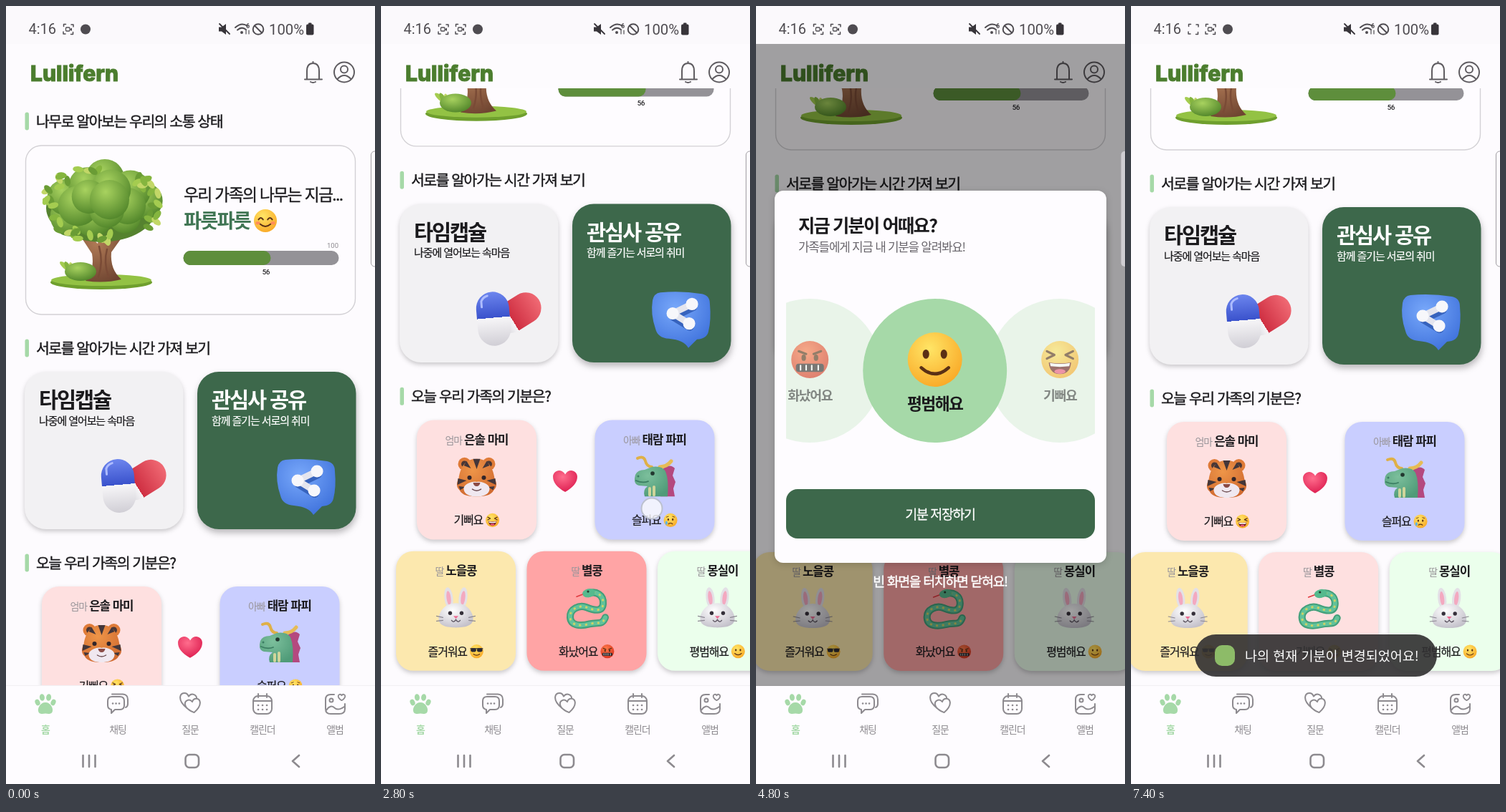
An HTML page for the animation above (7.5 s loop, 515 px wide and 1087 px high).

```html
<!DOCTYPE html>
<html lang="ko">
<head>
<meta charset="utf-8">
<style>
html,body{margin:0;width:100%;height:100%;overflow:hidden;background:#fdfbfe}
svg{display:block;width:100vw;height:100vh}
text{font-family:"Noto Sans CJK KR","Noto Sans KR",sans-serif;letter-spacing:-.073em;white-space:pre}
.lat{font-family:Roboto,sans-serif;letter-spacing:0}
.logo{font-family:Inter,sans-serif;letter-spacing:0}
.wide{letter-spacing:0}
.sh{filter:drop-shadow(0 3px 3px rgba(0,0,0,.2))}
.deep{filter:drop-shadow(1px 5px 5px rgba(0,0,0,.27))}
.pop{filter:drop-shadow(0 2px 5px rgba(0,0,0,.16))}
.line{fill:none;stroke:#8d8a8f;stroke-width:2;stroke-linecap:round;stroke-linejoin:round}
.dots{stroke-width:2.6}
</style>
</head>
<body>
<svg id="stage" viewBox="0 0 515 1087"></svg>
<script>
const GREEN = '#3d684b', MINT = '#a6d9a8', INK = '#1b1a1d', GRAY = '#8d8a8f', DARK = '#4f4c51', PAPER = '#fefcff';
const PINK = '#fee0e0', BLUE = '#c9ceff', SAND = '#fce8ae', RED = '#ffa4a5', LIME = '#ebffec';

let seed = 7;
const rnd = () => (seed = (seed * 16807) % 2147483647) / 2147483647;
const mix = (a, b, k) => a + (b - a) * k;
const loop = (n, f) => Array.from({length: n}, (_, i) => f(i)).join('');

// y is the visual middle of the line
const T = (x, y, s, str, {c = INK, w = 400, a = 'start', m = 0, cls = ''} = {}) =>
  `<text class="${cls}" x="${x}" y="${y + s * .37}" font-size="${s}" fill="${c}" font-weight="${w}" text-anchor="${a}"` +
  (m ? ` stroke="${c}" stroke-width="${m}"` : '') + `>${str}</text>`;
const R = (x, y, w, h, r, fill, more = '') =>
  `<rect x="${x}" y="${y}" width="${w}" height="${h}" rx="${r}" fill="${fill}" ${more}/>`;
const C = (x, y, r, fill, more = '') => `<circle cx="${x}" cy="${y}" r="${r}" fill="${fill}" ${more}/>`;
const O = (x, y, rx, ry, fill, turn = 0) =>
  `<ellipse cx="${x}" cy="${y}" rx="${rx}" ry="${ry}" fill="${fill}" transform="rotate(${turn} ${x} ${y})"/>`;
const P = (d, fill, more = '') => `<path d="${d}" fill="${fill}" ${more}/>`;
const L = (d, c, w, more = '') => P(d, 'none', `stroke="${c}" stroke-width="${w}" stroke-linecap="round" stroke-linejoin="round" ${more}`);
const G = (tf, body) => `<g transform="${tf}">${body}</g>`;
const flip = body => body + G('scale(-1 1)', body);
const use = (id, x, y, k = 1, more = '') => `<use href="#${id}" transform="translate(${x} ${y}) scale(${k})" ${more}/>`;
const sym = (id, body) => `<g id="${id}">${body}</g>`;
const ball = (id, a, b) => `<radialGradient id="${id}" cx=".4" cy=".3" r=".75"><stop stop-color="${a}"/><stop offset="1" stop-color="${b}"/></radialGradient>`;
const halves = (id, a, b, cut) => `<linearGradient id="${id}" x2="0" y2="1"><stop stop-color="${a}"/><stop offset="${cut}" stop-color="${b}"/><stop offset="${cut}" stop-color="#f7f6f8"/><stop offset="1" stop-color="#d0ced5"/></linearGradient>`;

const HEART = 'M0 14C-10 8-16 2-16-6-16-14-5-18 0-9 5-18 16-14 16-6 16 2 10 8 0 14z';

/* emoji, radius 10 */
const BROWN = '#5a3015';
const face = (id, body, skin = 'sun') => sym(id, C(0, 0, 10, `url(#${skin})`) + body);
const eyes = y => flip(O(3.3, y, 1.2, 1.7, BROWN));
const faces =
  face('joy', flip(L('M7-4.5L3-2.5 7-.5', BROWN, 1.2)) + P('M-6 1.5Q0 2.5 6 1.5 5.5 7.8 0 7.8-5.5 7.8-6 1.5z', '#6b1c1c') + P('M-5.4 1.8Q0 2.8 5.4 1.8L5 3.6Q0 4.2-5 3.6z', '#fff') + O(0, 6.4, 3, 1.3, '#f0567a')) +
  face('cool', flip(R(.6, -4.6, 8, 5.4, 2.2, '#2c2a33')) + L('M-9-4H9', '#2c2a33', 1.2) + L('M-4.5 4Q0 7.5 4.5 4', BROWN, 1.2)) +
  face('smile', eyes(-2) + L('M-5 3Q0 7.5 5 3', BROWN, 1.2)) +
  face('blush', flip(L('M2-1Q4-4 6-1', BROWN, 1.2) + O(6.5, 2, 2, 1.4, '#ff8d5a')) + L('M-4.5 3Q0 7 4.5 3', BROWN, 1.2)) +
  face('sad', eyes(-1) + flip(L('M6-4.5L3-5.5', BROWN, .9)) + L('M-3 5.5Q0 3 3 5.5', BROWN, 1.2) + O(-6, 4, 1.7, 2.8, '#5ab4f5')) +
  face('angry', eyes(-1) + flip(L('M6-4.5L2-3', BROWN, 1.2)) + R(-7.5, 2.2, 15, 4.4, 1.5, '#2f2629') + L('M-5 3.2V5.6M-2 3.2V5.6M1 3.2V5.6M4.5 3.2V5.6', '#fff', .8), 'hot');

/* animals, about 56 wide */
const tiger = flip(C(17, -18, 9, '#df7b38') + C(17, -18, 4.5, '#4a3735')) +
  P('M0-25C17-25 23-12 25 2 29 9 28 15 24 18 20 26 10 27 0 27-10 27-20 26-24 18-28 15-29 9-25 2-23-12-17-25 0-25z', 'url(#fur)') +
  P('M-5-25H5L0-11z', '#43363a') + flip(P('M14-22l-6 10 10-4zM26 2L14 5l13 6zM25 13l-9 1 7 4z', '#43363a')) +
  P('M0 7C8 5 19 11 18 17 17 25 8 27 0 27-8 27-17 25-18 17-19 11-8 5 0 7z', '#f0e8f0') +
  flip(C(10, 1, 3, '#33262a')) + P('M-5 8H5Q4 13 0 13-4 13-5 8z', '#8a4a45') + L('M-6 17Q0 21 6 17', '#6b4a4f', 1.5);
const dragon = P('M12-12Q22-19 28-12L25-2 29 7 26 16 28 27H8z', '#b4497f') +
  L('M-24-26Q-15-30-13-22T-4-14', '#dfb047', 4) + L('M23-22Q17-14 7-14', '#e6bc55', 5) +
  P('M-27-3Q-24-10-14-10L-4-14Q10-16 15-8 20 4 18 27H-14Q-17 18-10 13L-22 12Q-29 10-28 2z', 'url(#scale)') +
  L('M-26 5Q-17 9-9 6', '#3b7d62', 1.8) + C(-3, -5, 2.8, '#22372f') + C(-23, -1, 1.5, '#3b7d62') + L('M-7 16V25M-1 14V25', '#cfd59a', 4);
const rabbit = flip(O(10, -14, 6, 15, '#e3e0e6', 7) + O(10, -14, 3, 10, '#f3a9c0', 7)) +
  P('M0-7C15-7 24 5 24 15 24 25 12 27 0 27-12 27-24 25-24 15-24 5-15-7 0-7z', 'url(#snow)') +
  flip(L('M27 11L18 13M27 18L18 17', '#8b8791', 1.1) + C(8, 7, 2.7, '#35303a') + L('M0 16Q3 21 6 17', '#5b5460', 1.4)) +
  P('M-3.5 11H3.5L0 15z', '#ec6f95');
const spine = 'M2-20C13-25 24-18 23-6S10 3 0-1-24 1-23 13-8 25 4 22 22 24 26 13';
const snake = L(spine, '#429f7a', 10) + L(spine, '#62c29a', 6) + L(spine, '#cfd266', 3, 'stroke-dasharray=".5 8"') +
  O(3, -21, 9, 6, '#55b98d', -12) + C(2, -23, 1.6, '#243b30') + L('M-6-19L-14-16', '#e0393f', 1.6);

/* trees, 180 x 180, origin at the middle */
const spiral = (n, f) => loop(n, i => {
  const k = Math.sqrt((n - i - .5) / n), a = i * 2.4;
  return f(Math.cos(a) * k, Math.sin(a) * k, i);
});
const crown = (n, rx, ry, r, fills) => O(0, -26, rx + r * .6, ry + r * .55, '#55822f') +
  spiral(n, (x, y, i) => C(x * rx, -36 + y * ry, r * (.85 + rnd() * .3), `url(#${fills[i % fills.length]})`));
const LEAF = ['#a4cc50', '#85b53f', '#c2d767', '#6a9c35'];
const leaves = n => loop(n, i => {
  const a = rnd() * 6.283, k = .82 + rnd() * .24;
  return O(Math.cos(a) * 82 * k, -32 + Math.sin(a) * 50 * k, 7.5, 4.2, LEAF[i % 4], rnd() * 180);
});
const trunk = P('M-22 76Q-9 60-13 38L-34 6-26 4-5 24 0 0H9L8 24 27 4 34 8 14 36Q12 60 28 74 4 80-22 76z', 'url(#bark)') + L('M-4 70Q3 50-3 28M10 70Q3 50 8 32', '#7a4b36', 2.5);
const grass = O(0, 78, 71, 10, '#6f9f2e') + O(0, 75, 70, 8, '#93c244');
const bush = loop(5, i => O(-50 + i * 4, 56 + i * 2, 10, 3.5, LEAF[i % 4], 40 + i * 22)) + O(-29, 63, 22, 13, 'url(#leaf)');
const trees =
  sym('young', trunk + crown(6, 52, 30, 33, ['pale'])) +
  sym('mixed', trunk + crown(13, 62, 36, 24, ['leaf', 'gold', 'leaf'])) +
  sym('lush', grass + trunk + crown(14, 62, 34, 25, ['leaf']) + leaves(46) + bush) +
  sym('dense', grass + trunk + crown(34, 76, 46, 15, ['deep']));

const defs = '<defs>' + ball('sun', '#ffe566', '#f9a826') + ball('hot', '#ff7a4a', '#d8331f') + ball('fur', '#ee9548', '#d06a30') +
  ball('scale', '#7cbf9c', '#4f9b78') + ball('snow', '#ffffff', '#c2bfc9') + ball('leaf', '#a8d25f', '#4f8429') + ball('pale', '#c6d870', '#7d9f3c') +
  ball('gold', '#dbd863', '#90a032') + ball('deep', '#a5cb62', '#497f2b') + ball('bark', '#b07a56', '#6f4531') + ball('love', '#ff6d8d', '#dc1b4e') +
  ball('sky', '#78a8fa', '#3f72dc') + halves('blueCap', '#6d86ee', '#3a52cc', .48) + halves('redCap', '#f06a74', '#cf2f42', .68) +
  '<clipPath id="view"><rect y="115" width="515" height="835"/></clipPath><clipPath id="reel"><rect x="42" y="400" width="431" height="220"/></clipPath>' +
  faces + trees + sym('tiger', tiger) + sym('dragon', dragon) + sym('rabbit', rabbit) + sym('snake', snake) + '</defs>';

/* home page */
const heading = (y, s) => R(26.5, y - 12.5, 5.5, 25, 2.7, MINT) + T(42, y, 20.5, s, {m: .4});
const mood = (s, icon) => {
  const w = s.length * 13.7, x = -(w + 23) / 2;
  return T(x, 139, 16, s, {m: .2}) + use(icon, x + w + 13, 139, .95);
};
const member = (x, y, fill, role, name, pet, s, icon, id = '') =>
  G(`translate(${x} ${y})`,
    R(-83.5, 0, 167, 166, 24, fill, `class="sh" id="${id}"`) +
    `<text y="33" text-anchor="middle" font-size="14" fill="#99959a">${role} <tspan font-size="16.8" font-weight="700" fill="${INK}">${name}</tspan></text>` +
    use(pet, 0, 79) + `<g id="${id}Mood">${mood(s, icon)}</g>`);
const tile = (x, fill, c, cls, title, sub) => R(x, 511, 221.5, 220, 30, fill, `class="${cls}"`) +
  T(x + 20, 550, 29.5, title, {c, w: 700}) + T(x + 20, 579, 15, sub, {c, m: .2});
const link = 'M434 650L407 663 430 677';

const home =
  heading(161, '나무로 알아보는 우리의 소통 상태') +
  R(27.5, 195, 460, 236, 22, PAPER, 'stroke="#d3d1d5" stroke-width="1.4"') + use('lush', 133, 308) +
  T(248, 264, 22.8, '우리 가족의 나무는 지금...', {m: .3}) + T(248, 300, 27.4, '파릇파릇', {c: '#3f7553', w: 700}) + use('blush', 362, 300, 1.6) +
  T(464, 334, 9.5, '100', {c: GRAY, a: 'end', cls: 'lat'}) + R(247.5, 342, 217, 20, 10, '#949297') + R(247.5, 342, 122, 20, 10, '#5e8e3c') +
  T(363, 371, 9.5, '56', {a: 'middle', m: .2, cls: 'lat'}) +
  heading(478, '서로를 알아가는 시간 가져 보기') +
  tile(26, '#f2f1f3', INK, 'sh', '타임캡슐', '나중에 열어보는 속마음') +
  R(170, 628, 43, 68, 21.5, 'url(#redCap)', 'transform="rotate(58 191.5 662)"') +
  G('rotate(-5 157 670)', R(134, 633, 46, 75, 23, 'url(#blueCap)') + L('M142 653V645Q145 639 151 638', '#aebcff', 3)) +
  tile(267, GREEN, '#fff', 'deep', '관심사 공유', '함께 즐기는 서로의 취미') +
  P('M390 634Q418 631 448 636 459 638 459 650 461 672 457 688 455 698 441 699L429 711Q423 700 402 698 386 697 383 684 376 664 379 645 381 635 390 634z', 'url(#sky)') +
  G('translate(1 4)', L(link, '#3763bd', 12)) + L(link, '#e4e5ee', 9) + L('M434 650h.1M407 663h.1M430 677h.1', '#f7f7fb', 17) +
  heading(778, '오늘 우리 가족의 기분은?') +
  member(133.5, 811, PINK, '엄마', '은솔 마미', 'tiger', '기뻐요', 'joy') +
  member(382, 811, BLUE, '아빠', '태람 파피', 'dragon', '슬퍼요', 'sad') +
  G('translate(257 896) scale(1.06)', P(HEART, 'url(#love)')) +
  '<g id="row">' +
  member(104.5, 993, SAND, '딸', '노을콩', 'rabbit', '즐거워요', 'cool') +
  member(287, 993, RED, '딸', '별콩', 'snake', '화났어요', 'angry', 'mine') +
  member(469.5, 993, LIME, '딸', '몽실이', 'rabbit', '평범해요', 'smile') + '</g>';

const header = T(34, 94, 30, 'Lullifern', {c: '#4b7d2e', w: 800, m: 1, cls: 'logo'}) +
  L('M417 102.5H441M420 102V91Q420 80 428.5 80T437 91V102M428.5 80V78M425 106Q428.5 108 432 106M486 92.5A14 14 0 1 1 458 92.5 14 14 0 1 1 486 92.5M477 88.5A5 5 0 1 1 467 88.5 5 5 0 1 1 477 88.5M462.5 102Q472 92 481.5 102', '#5f5c61', 2);

/* pop-ups */
const sheet = (y, h, c, title, ...lines) => R(0, 53, 515, 897, 0, 'rgba(0,0,0,.37)') +
  T(257, 804, 18.4, '빈 화면을 터치하면 닫혀요!', {c: '#fff', a: 'middle', m: .4}) +
  R(26, y, 463, h, 12, PAPER, 'class="pop"') + T(59, y + 48.5, 25.3, title, {c, w: 700}) +
  lines.map((s, i) => T(59, y + 79 + i * 25 + (h < 517 ? 7 : 0), 16.9, s, {c: '#69666c'})).join('');
const level = ([tree, name], i) => {
  const x = 108 + i * 99.4;
  return T(x, 428, 13.8, '레벨 ' + (i + 1), {c: '#666', a: 'middle'}) + use(tree, x + 1, 484, .42) + T(x, 541, 18.6, name, {c: '#417355', w: 700, a: 'middle'});
};
const rule = ([w, fill, icon, a, b], i) => {
  const y = 614 + i * 54;
  return R(42, y - 20, w, 40, 20, fill) + G(`translate(68 ${y})`, icon) + T(84, y, 17.1, a, {m: .4}) + T(174, y, 15.6, b, {m: .3});
};
const letter = R(-10, -6, 20, 14, 1.5, '#f1eef2') + L('M-9-5L0 3 9-5', '#c3bcc8', 1.2) + P(HEART, '#ec4278', 'transform="translate(0 1) scale(.32)"');
const pill = G('rotate(-45)', R(-4.5, -11, 9, 22, 4.5, '#f3ce55') + P('M-4.5 0V-6.5A4.5 4.5 0 0 1 4.5-6.5V0z', '#d83d46'));
const gift = R(-9, -2, 18, 12, 1.5, '#3e86dc') + R(-10.5, -5, 21, 5, 1.5, '#4f9cf0') + R(-2, -5, 4, 15, 0, '#e33b48') + flip(L('M0-5Q8-4 7-8T0-5', '#e33b48', 2.2));
const treePop = sheet(260, 515, GREEN, '소통나무 키우기', '가족들의 소통 상태를 나무로 확인할 수 있어요.', '점수를 높여 소통 나무를 키워보세요!') +
  L('M222 323Q231 318 236 304', '#5f9a35', 3) + P('M235 308Q234 296 251 295 252 309 235 308z', '#7dbb3c') + P('M233 312Q227 301 219 305 220 315 233 312z', '#5fa233') +
  G('translate(306 371)', flip(O(5.5, 1, 4.3, 7, '#f3d3b8', 12) + O(4, -4, 3, 3.5, '#e8bf9f', -40))) +
  R(42, 406, 431, 161, 26, '#e6f4e8') +
  [['young', '민둥맨둥'], ['mixed', '무럭무럭'], ['lush', '파릇파릇'], ['dense', '초록초록']].map(level).join('') +
  [[275, PINK, letter, '랜덤 질문', '모든 가족 참여 시 + 10'],
   [318, BLUE, pill, '타임 캡슐', '가족 구성원 중 1명 참여 시 + 3'],
   [359, SAND, gift, '관심사 공유', '가족 구성원 중 1명 관심사 인증 시 + 3']].map(rule).join('');
const moodPop = sheet(258, 520, INK, '지금 기분이 어때요?', '가족들에게 지금 내 기분을 알려봐요!') +
  '<g clip-path="url(#reel)"><g id="wheel"></g></g>' +
  R(42, 675, 431, 69, 16, GREEN) + T(257, 710, 18.4, '기분 저장하기', {c: '#fff', a: 'middle', m: .3});

/* system bars */
const paw = G('translate(55 975)', flip(O(4.6, -9, 3.5, 4.8, MINT, 8) + O(11, -2, 3.3, 4.5, MINT, 25)) + P('M0-2C7-2 11 6 10 10 9 15 4 14 0 13.5-4 14-9 15-10 10-11 6-7-2 0-2z', MINT));
const tabs = R(0, 950, 515, 137, 0, PAPER) + paw + '<g class="line">' +
  P('M148 965H159Q165 965 165 971V977Q165 983 159 983H152L147 988V983Q142 982 142 977V971Q142 965 148 965zM148 961.5H163Q170 962 170 969V975Q170 979 167 980', 'none') +
  P('M149 974.5h.1M153.5 974.5h.1M158 974.5h.1', 'none', 'class="dots"') +
  G('translate(254 971) rotate(8) scale(.72)', P(HEART, 'none', 'stroke-width="2.8"')) + G('translate(261 978) rotate(-10) scale(.66)', P(HEART, PAPER, 'stroke-width="3"')) +
  R(345, 964, 26, 25, 7, 'none') + P('M345 971H371M352 961V966M364 961V966', 'none') +
  loop(6, i => P(`M${352 + i % 3 * 6} ${i < 3 ? 977 : 983}h.1`, 'none', 'class="dots"')) +
  P('M458 962H453Q446 962 446 969V982Q446 989 453 989H465Q473 989 473 982V975M447 984Q453 975 459 981 464 985 472 979', 'none') + C(454, 970, 2.5, 'none') +
  G('translate(468.5 966) scale(.3)', P(HEART, 'none', 'stroke-width="6"')) + '</g>' +
  ['홈', '채팅', '질문', '캘린더', '앨범'].map((s, i) => T(55 + i * 101, 1011, 13.9, s, {c: i ? GRAY : MINT, w: i ? 400 : 700, a: 'middle'})).join('') +
  L('M107.5 1047V1063M116 1047V1063M124.5 1047V1063M409 1047L400 1055 409 1063', GRAY, 2.6) + R(250.5, 1046, 18.5, 18, 5.5, 'none', `stroke="${GRAY}" stroke-width="2.6"`);

const corners = x => G(`translate(${x + 7} 32.5)`, loop(4, i => L('M4-6.5H7V-3.5', DARK, 1.5, `transform="rotate(${i * 90})"`)));
const camera = x => R(x + 3.5, 30, 5.5, 5, 1, 'none', `stroke="${DARK}" stroke-width="1.3"`) + P(`M${x + 9.5} 32l2.5-1.5v4.5l-2.5-1.5z`, DARK);
const dot = x => C(x, 32.5, 7, DARK);
const status = R(0, 0, 515, 53, 0, '#fbf9fc') + T(31.5, 32, 20, '4:16', {c: DARK, cls: 'lat'}) +
  corners(80) + `<g id="cam">${camera(80)}</g><g id="one">${dot(111)}</g><g id="two">${corners(104) + camera(104) + dot(135)}</g>` +
  P('M297 29.5H301L307 25V40L301 35.5H297z', '#38353a') + L('M298 25L312 39', '#38353a', 1.8) +
  L('M320 30Q329 22 337 28M323 33.5Q329 28 335 33', DARK, 2) + C(329, 37, 2, DARK) + T(335, 28, 9, '6', {c: DARK, w: 700, cls: 'lat'}) + L('M335 34V39M339 34V39', DARK, 1.2) +
  C(352, 32.5, 7.3, 'none', `stroke="${DARK}" stroke-width="2"`) + L('M347 27.5L357 37.5', DARK, 2) +
  T(367, 32, 20.3, '100%', {c: DARK, cls: 'lat'}) + R(419, 25.5, 10.5, 15, 2, '#38353a') + R(422, 23.5, 4.5, 3, 1, '#38353a');

const toast = R(89, 878, 338, 59, 29.5, 'rgba(50,49,50,.91)') + R(117, 893, 28, 29, 10, '#8dbb68') + T(159, 908, 18.5, '나의 현재 기분이 변경되었어요!', {c: '#fff', cls: 'wide'});

const $ = id => document.getElementById(id);
$('stage').innerHTML = defs + R(0, 0, 515, 1087, 0, '#fdfbfe') +
  `<g clip-path="url(#view)"><g id="page">${home}</g></g>` + R(0, 949, 515, 1, 0, '#f2f0f3') + header +
  `<g id="treePop">${treePop}</g><g id="moodPop">${moodPop}</g>` +
  R(509.5, 203, 14, 161, 5, '#fdfbfe', 'id="edge"') + tabs + status + `<g id="toast">${toast}</g>` +
  C(0, 0, 14.5, 'rgba(250,250,253,.82)', 'id="touch" stroke="#bcc1cf" stroke-width="2"');

/* motion */
const ramp = (t, a, b) => Math.min(1, Math.max(0, (t - a) / (b - a)));
const ease = (t, a, b) => { const k = ramp(t, a, b); return k * k * (3 - 2 * k); };
const within = (t, a, b) => t >= a && t < b;
const show = (id, on) => $(id).setAttribute('display', on ? 'inline' : 'none');

const moods = [['화났어요', 'angry'], ['평범해요', 'smile'], ['기뻐요', 'joy'], ['즐거워요', 'cool'], ['슬퍼요', 'sad']];
const wheel = pos => moods.map(([s, icon], i) => ({s, icon, d: i - 1 - pos}))
  .sort((a, b) => Math.abs(b.d) - Math.abs(a.d))
  .map(({s, icon, d}) => {
    const x = 249.7 + 174.5 * d, k = Math.max(0, 1 - Math.abs(d));
    return C(x, 509.5, 100.5, PAPER, `opacity="${k}"`) + C(x, 509.5, 100.5, MINT, `opacity="${mix(.25, 1, k)}"`) +
      use(icon, x, 494, mix(2.6, 3.8, k), `opacity="${mix(.6, 1, k)}"`) +
      `<g opacity="${mix(.5, 1, k)}">${T(x, mix(544, 556, k), mix(18.3, 22.8, k), s, {w: 700, a: 'middle'})}</g>`;
  }).join('');

// the finger follows whatever it drags
function finger(t, scroll, slide, spin) {
  if (within(t, 500, 700)) return [150, 310];
  if (within(t, 1600, 1800)) return [260, 868];
  if (within(t, 2500, 2900)) return [378, 932 - scroll];
  if (within(t, 3500, 4400)) return [399 + slide, 903];
  if (within(t, 4500, 4700)) return [262, 850];
  if (within(t, 5200, 5500)) return [370 - 174.5 * spin, 515];
  if (within(t, 6100, 6200)) return [262, 712];
}

let last = -1;
function draw(t) {
  if (t === last) return;
  last = t;
  const scroll = 230 * ease(t, 2500, 2800), stretch = .0068 * (ramp(t, 2700, 2800) - ease(t, 2800, 3100));
  const slide = -58 * ease(t, 3500, 3900) + 32.7 * ease(t, 4100, 4400), spin = ease(t, 5200, 5700);
  const tree = within(t, 900, 1900), ask = within(t, 4700, 6300), saved = t >= 6900;
  $('page').setAttribute('transform', `translate(0 950) scale(1 ${1 + stretch}) translate(0 ${-950 - scroll})`);
  $('row').setAttribute('transform', `translate(${slide} 0)`);
  show('treePop', tree);
  show('moodPop', ask);
  if (ask) $('wheel').innerHTML = wheel(spin);
  $('edge').setAttribute('fill', tree || ask ? '#cfcdd1' : '#fdfbfe');
  $('edge').setAttribute('stroke', tree || ask ? 'none' : '#a09da2');
  $('mine').setAttribute('fill', saved ? PINK : RED);
  $('mineMood').innerHTML = saved ? mood('기뻐요', 'joy') : mood('화났어요', 'angry');
  show('one', t < 300);
  show('two', t >= 300);
  show('cam', t < 5100);
  $('toast').setAttribute('opacity', ramp(t, 6300, 6600));
  const spot = finger(t, scroll, slide, spin);
  show('touch', spot);
  if (spot) $('touch').setAttribute('transform', `translate(${spot.join(' ')})`);
}
const start = performance.now();
function tick() {
  const t = (performance.now() - start) % 7500;
  draw(Math.floor(t / 100) * 100);
  requestAnimationFrame(tick);
}
tick();
</script>
</body>
</html>
```
